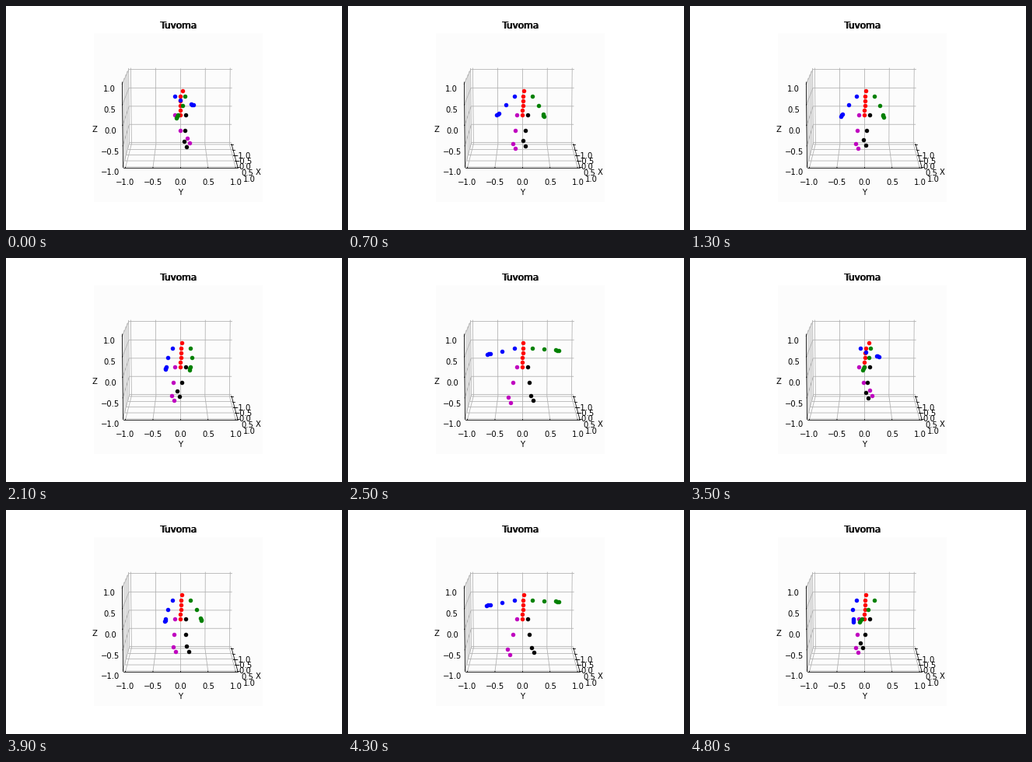
A matplotlib script that plays this animation: 432 by 288 pixels, repeating every 4.9 s.

```python
import numpy as np
import matplotlib.pyplot as plt
from matplotlib.animation import FuncAnimation

W, H, DPI = 432, 288, 72
FRAMES, STEP = 49, 100
PELVIS = np.array([224.3, 140.3])
ARM_SPAN, ARM_DROP = 43.5, 24.5

# right hand, left hand, right foot, left foot, sway: all sideways offsets
POSES = {
    "turned": (13.5, -3.5, 15.5, -2, 0),
    "relaxed": (-28, 23.5, -4, -8, 1.5),
    "narrow": (-18.5, 12.5, -4, -11, 1.5),
    "open": (-30, 33.5, 8, 2, -1.2),
    "twisted": (15.5, -0.5, 14, -5, 2),
    "wide": (-41.5, 43, -12, 5, 1.5),
    "crossed": (-14.5, -3.5, -4.5, -12, 1.5),
}
KEYS = [(0, "turned"), (600, "relaxed"), (1000, "wide"), (1300, "relaxed"),
        (2100, "narrow"), (2450, "wide"), (2900, "open"), (3000, "crossed"),
        (3500, "twisted"), (4200, "wide"), (4300, "wide"), (4800, "crossed")]
TIMES = [t for t, _ in KEYS]


def pose(t):
    """Offsets at time t, eased between the two nearest keys."""
    i = min(np.searchsorted(TIMES, t, side="right") - 1, len(KEYS) - 2)
    (t0, a), (t1, b) = KEYS[i], KEYS[i + 1]
    u = (t - t0) / (t1 - t0)
    u = u * u * (3 - 2 * u)
    return (1 - u) * np.array(POSES[a]) + u * np.array(POSES[b])


def arm(side, reach, neck, turn):
    """The hand hangs low near the body and rises as it reaches out."""
    shoulder = neck + (side * (11.5 - 5 * turn), 0.3)
    drop = ARM_DROP * (1 - min(abs(reach) / ARM_SPAN, 1) ** 6)
    if side < 0:
        drop *= 1 - 0.6 * turn
    wrist = np.array([224.5 + reach, 116.3 + drop])
    slack = max(0, 30 - np.hypot(*(wrist - shoulder)))
    elbow = (shoulder + wrist) / 2 + (side * 0.4 * slack, 0)
    hand = 0.27 * (wrist - elbow)
    return [shoulder, elbow, wrist, wrist + hand / 2, wrist + hand]


def leg(side, swing):
    """The foot lifts a little as it swings inward."""
    hip = PELVIS + (side * 6.8, 0)
    ankle = hip + (swing, 35.3 + 0.35 * side * swing)
    return [hip, hip + (0.45 * swing, 20), ankle, ankle + (3, 6.5)]


def skeleton(t):
    """Joints per colour, in stage pixels."""
    right, left, right_foot, left_foot, sway = pose(t)
    turn = np.clip((right + 10) / 24, 0, 1)  # the chest follows the right hand
    neck = np.array([224.2 + sway, 116.5])
    head = neck + (0.3 + 3.5 * turn, -7.3)
    return {
        "m": leg(-1, right_foot),
        "k": leg(1, left_foot),
        "r": [head, *np.linspace(neck, PELVIS, 5)],
        "g": arm(1, left, neck, turn),
        "b": arm(-1, right, neck, turn),
    }


fig = plt.figure(figsize=(W / DPI, H / DPI), dpi=DPI, facecolor="white")
ax = fig.add_subplot(111, projection="3d")
fig.subplots_adjust(left=0.125, right=0.9, bottom=0.125, top=0.88)
ax.set_facecolor("#fcfcfc")
ax.view_init(elev=10, azim=1e-6)  # just off zero keeps the wall on the left
reach = 25 / 24
ax.set(xlim=(-reach, reach), ylim=(-reach, reach), zlim=(-reach, reach),
       xlabel="X", ylabel="Y", zlabel="Z")
for axis in (ax.xaxis, ax.yaxis, ax.zaxis):
    axis.set_ticks(np.linspace(-1, 1, 5))
    axis.set_pane_color((1, 1, 1, 0))

# Flat layer in pixel coordinates for the title and the joints.
flat = fig.add_axes([0, 0, 1, 1])
flat.set(xlim=(0, W), ylim=(H, 0))
flat.axis("off")
for x in (221, 222):  # doubled for a heavy stroke
    flat.text(x, 28.6, "Tuvoma", fontsize=12, ha="center", va="baseline")

dots = {color: flat.scatter([], [], s=20, c=color) for color in skeleton(0)}


def update(i):
    for color, joints in skeleton(i * STEP).items():
        dots[color].set_offsets(np.array(joints) - 0.5)
    return list(dots.values())


anim = FuncAnimation(fig, update, frames=FRAMES, interval=STEP,
                     init_func=lambda: update(0), repeat=True, repeat_delay=0)
plt.show()
```
